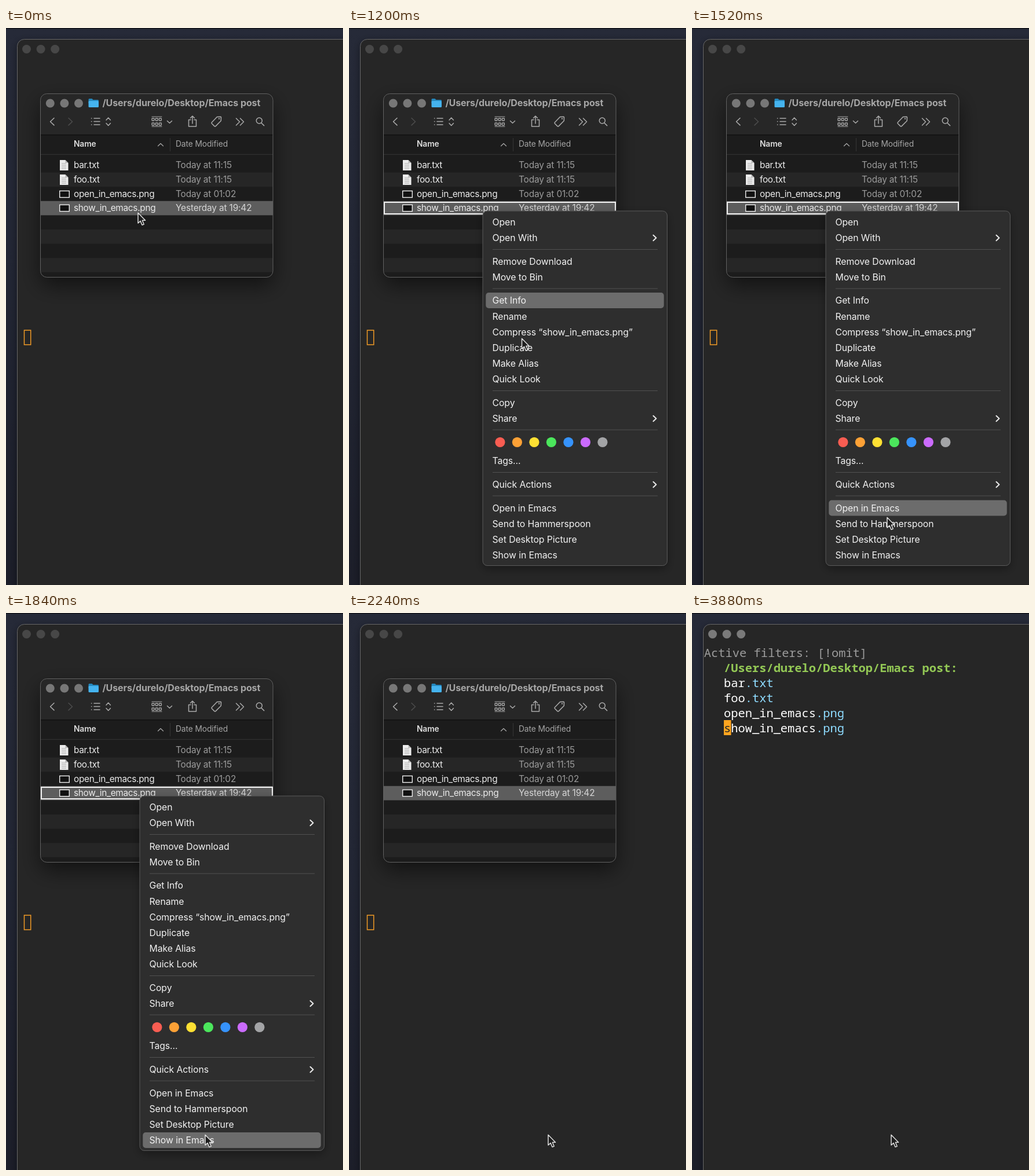
Write an HTML page that moves like this. It is 582 px wide and 962 px high and loops after 4040 ms.

```html
<!DOCTYPE html>
<html lang="en">
<head>
<meta charset="utf-8">
<title>Show in Emacs</title>
<style>
html, body { margin: 0; width: 100%; height: 100%; overflow: hidden; background: #20232e; }
svg { display: block; width: 582px; height: 962px; }
text { font-family: Inter, "Open Sans", sans-serif; white-space: pre; }
.list { font-size: 15.4px; letter-spacing: -.02em; fill: #ebebeb; }
.date { letter-spacing: -.01em; fill: #9b9b9b; }
.head { font-size: 13.8px; letter-spacing: -.008em; fill: #a5a5a5; }
.title { font-size: 16px; font-weight: 700; letter-spacing: -.006em; fill: #a6a6a6; }
.item { font-size: 15.8px; letter-spacing: -.005em; fill: #f2f2f2; }
.mono { font: 500 20.4px "Noto Sans Mono", "DejaVu Sans Mono", monospace; fill: #fff; }
.line { fill: none; stroke: #aaa; stroke-width: 1.5; stroke-linecap: round; stroke-linejoin: round; }
</style>
</head>
<body>
<svg id="stage" viewBox="0 0 582 962" xmlns="http://www.w3.org/2000/svg"></svg>
<script>
const LOOP = 4040, STEP = 40;
const USER = "durelo";
const DIR = `/Users/${USER}/Desktop/Emacs post`;

const rect = (x, y, w, h, fill, more = "") =>
  `<rect x="${x}" y="${y}" width="${w}" height="${h}" fill="${fill}" ${more}/>`;
const text = (x, y, cls, s, more = "") => `<text x="${x}" y="${y}" class="${cls}" ${more}>${s}</text>`;
const line = (d, more = "") => `<path class="line" d="${d}" ${more}/>`;
const dot = (x, y, r, fill) => `<circle cx="${x}" cy="${y}" r="${r}" fill="${fill}"/>`;
const lights = (x, y, fill) => [0, 24.6, 49.2].map(d => dot(x + d, y, 7.5, fill)).join("");

// Finder window
const files = [
  ["bar.txt", "Today at 11:15"],
  ["foo.txt", "Today at 11:15"],
  ["open_in_emacs.png", "Today at 01:02"],
  ["show_in_emacs.png", "Yesterday at 19:42"]
];
const ROW = 24.6, TOP = 225;

function fileIcon(name, y) {
  if (name.endsWith("png")) return rect(92.7, y - 5.6, 16.6, 11.2, "#111", 'stroke="#eee" stroke-width="1.4"');
  const rules = [-3, 0, 3, 6].map(d => `M96 ${y + d}h8`).join("");
  return `<path d="M93 ${y - 9}h9.5l5 5v13h-14.5z" fill="#ececec"/>` +
    `<path d="M102.5 ${y - 9}v5h5z" fill="#b5b5b5"/>` +
    `<path d="${rules}" stroke="#aaa" stroke-width="1"/>`;
}

function fileRow([name, date], i) {
  const mid = TOP + ROW * (i + .5), on = i === 3;
  return fileIcon(name, Math.round(mid)) + text(117, mid + 5, "list", name) +
    text(293, mid + 5, "list date", date, on ? 'style="fill:#d6d6d6"' : "");
}

function toolbar() {
  let grid = "";
  for (let r = 0; r < 2; r++) for (let c = 0; c < 3; c++)
    grid += rect(252 + c * 6.2, 156 + r * 8, 4, 4, "none", 'stroke="#aaa" stroke-width="1.3" rx=".8"');
  return line("M83 155.5l-6.5 6.2 6.5 6.2") +
    line("M108 155.5l6.5 6.2-6.5 6.2", 'style="stroke:#4c4c4c"') +
    line("M152 156h10M152 161.5h10M152 167h10M147.5 156h.4M147.5 161.5h.4M147.5 167h.4") +
    line("M173 159l3.7-4 3.7 4M173 164.5l3.7 4 3.7-4") +
    grid + line("M252 153.2h17M252 170.2h17", 'style="stroke-width:1"') +
    line("M278.5 160.5l4 3.8 4-3.8") +
    line("M319 158.5h-3.5v11.5h13v-11.5h-3.5M322 165v-12.5M318.5 155.5l3.5-3.5 3.5 3.5") +
    line("M364.5 153.5l6-.2q1 0 1 1l-.2 6-9.3 9.3q-1 .8-2 0l-4.6-4.6q-.9-1 0-2z") + dot(368, 156.6, 1.2, "#aaa") +
    line("M397.5 156l6 6-6 6M404.5 156l6 6-6 6") +
    '<circle class="line" cx="437.3" cy="160" r="5"/>' + line("M441 164l4.7 4.6");
}

function finder() {
  let bands = "";
  for (let i = 1; i < 8; i += 2)
    bands += rect(60, TOP + i * ROW, 401, ROW, i === 3 ? "#5d5d5d" : "#262626");
  return `<g id="finder">
    ${rect(60, 114, 401, 316, "#1d1d1d", 'rx="11" filter="url(#deep)"')}
    <g clip-path="url(#pane)">
      ${rect(60, 114, 401, 71, "#272727")}${rect(60, 184, 401, 1.2, "#0d0d0d")}
      ${rect(60, 217.8, 401, 1, "#363636")}${rect(283, 190, 1, 23, "#363636")}${bands}
    </g>
    ${rect(59.5, 113.5, 401.5, 317, "none", 'rx="11" stroke="#626262" stroke-width="1"')}
    ${lights(76.3, 130, "#777")}
    <path d="M142.5 123.5q0-1.5 1.5-1.5h4.5l2 2h8q1.5 0 1.5 1.5v4h-17.5z" fill="#2487bd"/>
    ${rect(142.5, 126, 17.5, 11, "#45b3ee", 'rx="1.5"')}
    ${text(166.5, 135, "title", DIR)}${toolbar()}
    ${text(117, 205.3, "head", "Name", 'font-weight="600" style="fill:#dedede"')}
    ${line("M262.5 203.8l4.5-4.3 4.5 4.3", 'style="stroke-width:1.2"')}
    ${text(293, 205.3, "head", "Date Modified")}
    ${files.map(fileRow).join("")}
    ${rect(61, 301, 399, 20, "none", 'id="ring" stroke="#f0f0f0" stroke-width="2"')}
  </g>`;
}

// Context menu: [centre y, label, has submenu]
const items = [
  [335.5, "Open"], [362.5, "Open With", 1], [403.5, "Remove Download"], [430.5, "Move to Bin"],
  [470.5, "Get Info"], [498, "Rename"], [525, "Compress “show_in_emacs.png”"], [552, "Duplicate"],
  [579, "Make Alias"], [606.5, "Quick Look"], [647, "Copy"], [674.5, "Share", 1], [747, "Tags..."],
  [788.5, "Quick Actions", 1], [829, "Open in Emacs"], [856, "Send to Hammerspoon"],
  [883.5, "Set Desktop Picture"], [910.5, "Show in Emacs"]
];
const rules = [382, 449.5, 626, 693.5, 767, 807.5];
const tags = ["#f95d52", "#fda136", "#fee033", "#4be65c", "#3693fc", "#cb6bfd", "#a3a4a6"];

function menu() {
  return `<g id="menu">
    ${rect(231, 316, 318.5, 613, "#2d2d2d", 'rx="8" filter="url(#soft)"')}
    ${rect(231, 316, 318.5, 612.5, "none", 'rx="8" stroke="#5a5a5a" stroke-width="1"')}
    ${rect(236.3, 0, 307.5, 27, "#6c6c6c", 'id="bar" rx="5"')}
    ${rules.map(y => rect(248, y, 285, 1, "#515151")).join("")}
    ${tags.map((c, i) => dot(260.9 + i * 29.5, 715.3, 8.6, c)).join("")}
    ${items.map(([y, label, sub]) => text(247.5, y + 5.7, "item", label) +
      (sub ? line(`M525.5 ${y - 4.7}l5 4.7-5 4.7`, 'style="stroke:#e8e8e8;stroke-width:2"') : "")).join("")}
  </g>`;
}

// Directory listing
function dired() {
  const row = (i, s, more) => text(55, 102 + 26 * i, "mono", s, more);
  const name = ([n]) => n.replace(/\..+/, e => `<tspan fill="#8fdcff">${e}</tspan>`);
  return `<g id="dired">
    ${lights(35.5, 36.5, "#7a7a7a")}
    ${text(20.8, 76, "mono", "Active filters: [!omit]", 'style="fill:#9c9c9c"')}
    ${row(0, DIR + ":", 'style="fill:#93c855;font-weight:700"')}
    ${files.map((f, i) => row(i + 1, name(f))).join("")}
    ${rect(55.5, 186, 11.5, 24.5, "none", 'id="hollow" stroke="#f59a1b" stroke-width="1.4"')}
    <g id="block">${rect(55, 185, 12.5, 26, "#ffa51f")}${text(55, 206, "mono", "s", 'style="fill:#272727"')}</g>
  </g>`;
}

const stage = document.getElementById("stage");
stage.innerHTML = `<defs>
  <linearGradient id="sky" x2="0" y2="1"><stop stop-color="#262a38"/><stop offset=".45" stop-color="#222634"/><stop offset="1" stop-color="#1c1e29"/></linearGradient>
  <clipPath id="pane"><rect x="60" y="114" width="401" height="316" rx="11"/></clipPath>
  <filter id="deep" x="-30%" y="-30%" width="160%" height="170%"><feDropShadow dx="0" dy="14" stdDeviation="18" flood-color="#000" flood-opacity=".55"/></filter>
  <filter id="soft" x="-20%" y="-10%" width="140%" height="120%"><feDropShadow dx="0" dy="5" stdDeviation="8" flood-color="#000" flood-opacity=".35"/></filter>
  <filter id="edge" x="-10%" y="-10%" width="120%" height="120%"><feDropShadow dx="0" dy="3" stdDeviation="7" flood-color="#000" flood-opacity=".45"/></filter>
</defs>
${rect(0, 0, 582, 962, "url(#sky)")}${rect(0, 0, 582, 1.2, "#0b0c10")}
${rect(19.5, 20, 640, 1000, "#272727", 'rx="12" filter="url(#edge)"')}
${rect(19.5, 19.5, 640, 1000, "none", 'rx="12" stroke="#686868" stroke-width="1"')}
<g id="idle">${lights(35.5, 36.5, "#474747")}${rect(31.5, 522, 11.2, 25, "none", 'stroke="#f09a26" stroke-width="1.5"')}</g>
${finder()}${menu()}${dired()}
<path id="mouse" d="M0 .8V18.6L4.1 14.9 7 21.8 10.2 20.5 7.4 13.7H12.6Z" fill="#1e1e1e" stroke="#dcdcdc" stroke-width="1.5" stroke-linejoin="round"/>`;

const el = id => document.getElementById(id);
const show = (id, on) => el(id).setAttribute("visibility", on ? "visible" : "hidden");

// Pointer positions, one per step from 1080 ms
const path = [
  [228, 318.5], [243, 385], [271, 465], [298.5, 535.5], [312, 600], [320, 651], [325, 696],
  [329, 736], [332, 771], [334, 800], [336, 826], [337, 844.5], [339, 858], [341, 870.5],
  [342, 881], [343, 889], [343, 894], [344, 897.5], [344, 899.5], [344, 900.5]
];
const pointer = t => path[Math.max(0, Math.min(path.length - 1, (t - 1080) / STEP))];

function draw(time) {
  const t = Math.floor(time % LOOP / STEP) * STEP;
  const open = t >= 840 && t < 2240;
  const listed = t >= 2720;

  const [x, y] = pointer(t);
  el("mouse").setAttribute("transform", `translate(${x} ${y})`);

  // The highlight trails the pointer by one step and blinks on the click.
  const lagY = pointer(t - STEP)[1];
  const hit = items.find(([mid]) => Math.abs(mid - lagY) <= 13.6);
  const lit = open && hit && t !== 2040;
  show("bar", lit);
  if (lit) el("bar").setAttribute("y", hit[0] - 13.5);

  show("menu", open);
  el("menu").setAttribute("opacity", t < 2120 ? 1 : Math.max(0, 1 - (t - 2080) / 160));
  show("ring", open && t < 2120);

  show("finder", !listed);
  show("idle", !listed);
  show("dired", listed);
  show("hollow", listed && t < 2840);
  const blinkOn = t < 3040 || Math.floor((t - 3040) / 280) % 2 === 1;
  show("block", t >= 2840 && blinkOn);
}

const start = performance.now();
function tick() {
  draw(performance.now() - start);
  requestAnimationFrame(tick);
}
tick();
</script>
</body>
</html>
```
